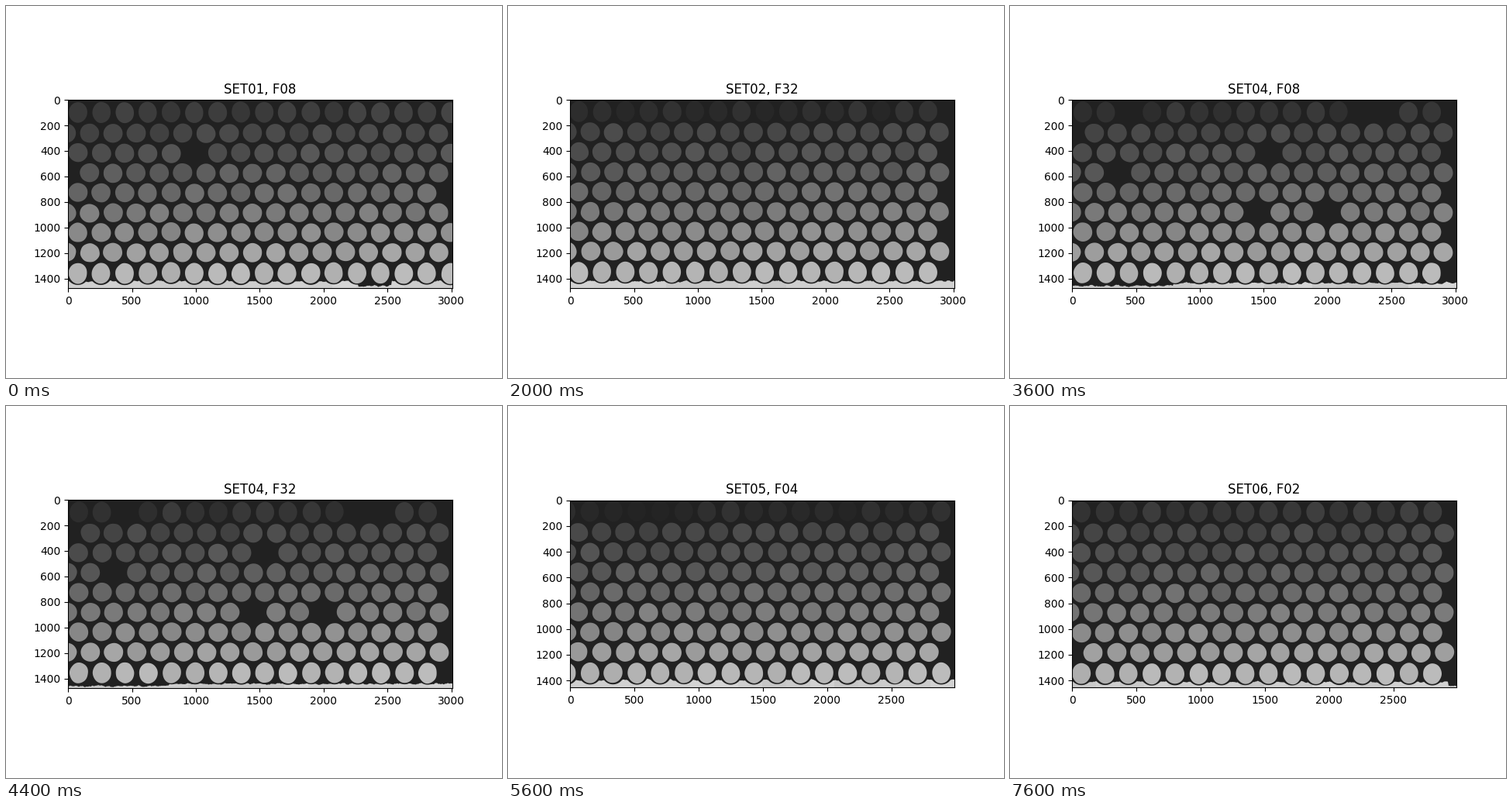
A matplotlib script for the animation above (8000 ms loop, 640x480 px).

```python
import itertools

import numpy as np
import matplotlib.pyplot as plt
from matplotlib.animation import FuncAnimation
from matplotlib.collections import PolyCollection

BACKGROUND = 33
LEFT, WIDTH, MIDDLE = 80, 496, 242.4  # plot area in stage pixels
LARGE, SMALL = (3008, 1473), (2990, 1455)
ROWS = 9
FIRST, LAST = 0, ROWS - 1


def sample(size, x0, y0, top_gray, sand, x_max=566, holes=(), bare=(0, 0)):
    """Key figures of one packing; holes are (row, column) without a grain."""
    return dict(size=size, x0=x0, y0=y0, top_gray=top_gray, sand=sand,
                x_max=x_max, holes=holes, bare=bare)


SAMPLES = [
    sample(LARGE, 92.9, 137.4, 62, 353.2, x_max=580,
           holes=[(2, 5), (3, 0), (4, 16)], bare=(455, 497)),
    sample(LARGE, 91.3, 136.0, 46, 352.0),
    sample(LARGE, 75.9, 137.1, 60, 353.7, x_max=580,
           holes=[(7, 4), (7, 16)], bare=(533, 550)),
    sample(LARGE, 93.8, 137.0, 52, 355.4,
           holes=[(0, 2), (0, 12), (0, 13), (1, 0), (2, 8), (3, 2),
                  (5, 8), (5, 11)], bare=(80, 210)),
    sample(SMALL, 75.6, 135.8, 43, 352.0),
    sample(SMALL, 92.2, 136.7, 57, 355.4, holes=[(7, 0)], bare=(566, 577)),
]
STEPS = [*itertools.product(range(4), (8, 16, 32)),
         *((4, 2 ** n) for n in range(6)), (5, 1), (5, 2)]

fig, ax = plt.subplots(figsize=(6.4, 4.8), dpi=100)


def to_data(points, size):
    """Turn stage pixels into image coordinates."""
    w, h = size
    scale = w / WIDTH
    x, y = np.asarray(points, float).T
    return np.column_stack([(x - LEFT) * scale - 0.5,
                            (y - MIDDLE) * scale + h / 2 - 0.5])


def gray(level):
    return (np.clip(level, 0, 255) / 255,) * 3


def radii(row):
    return (11.9, 13.4) if row in (FIRST, LAST) else (12.4, 12.2)


def row_offset(row):
    return 25.6 * row + 1.2 * (row > FIRST) + 1.2 * (row == LAST)


def row_gray(s, row):
    return s["top_gray"] if row == FIRST else 65 + 6.6 * row + row ** 2


def grain(cx, cy, rx, ry, rng):
    angle = np.linspace(0, 2 * np.pi, 60, endpoint=False)
    radius = 1 + sum(rng.normal(0, 0.025 / n) * np.cos(n * angle + rng.uniform(0, 6))
                     for n in (2, 3, 5, 7))
    return np.column_stack([cx + rx * radius * np.cos(angle),
                            cy + ry * radius * np.sin(angle)])


def packing(s, seed, step):
    """Staggered rows, each shaded by how high its grains' tops lie."""
    rng = np.random.default_rng(seed)
    wobble = np.random.default_rng(1000 + step)
    pitch = 90300 / s["size"][0]
    shapes, shades, bottom = [], [], []
    for row in range(ROWS):
        start = s["x0"] + pitch / 2 * (row % 2)
        if start - pitch > 72:
            start -= pitch
        xs = np.arange(start, s["x_max"], pitch)
        n = len(xs)
        xs += rng.normal(0, 0.25, n)
        ys = s["y0"] + row_offset(row) * pitch / 30 + rng.normal(0, 0.3, n)
        tops = ys + 0.04 * np.arange(n) + wobble.normal(0, 0.1, n)
        ranks = tops.argsort().argsort() / n - 0.5
        for col, (x, y, rank) in enumerate(zip(xs, ys, ranks)):
            if (row, col) in s["holes"]:
                continue
            shapes.append(grain(x, y, *radii(row), rng))
            shades.append(gray(row_gray(s, row) + 15 * rank))
            if row == LAST:
                bottom.append((x, y))
    return shapes, shades, bottom


def sand(s, bottom, filter_size, step):
    """Bright floor whose surface peaks between the lowest grains."""
    rng = np.random.default_rng(2000 + step)
    x = np.linspace(LEFT, LEFT + WIDTH, WIDTH + 1)
    rough = np.convolve(rng.normal(0, 1.3, len(x) + 4), np.ones(5) / 5, "valid")
    top = s["sand"] + 0.6 * np.log2(filter_size) + rough
    rx, ry = radii(LAST)
    for cx, cy in bottom:
        u = np.clip(abs(x - cx) / (rx + 3), 0, 1)
        rim = cy + (ry + 1.6) * np.sqrt(1 - u ** 2)
        top = np.maximum(top, rim)
    a, b = s["bare"]
    top = np.where((x >= a) & (x <= b), np.maximum(top, 361.3 + rough), top)
    top = np.minimum(top, 364)

    shapes, shades = [], []
    for a, b in itertools.pairwise(range(0, WIDTH + 1, 31)):
        part = slice(a, b + 1)
        shapes.append([*zip(x[part], top[part]), (x[b], 366), (x[a], 366)])
        shades.append(gray(rng.uniform(198, 214)))
    return shapes, shades


def draw(step):
    index, filter_size = STEPS[step]
    s = SAMPLES[index]
    w, h = size = s["size"]
    ax.clear()
    ax.set_facecolor(gray(BACKGROUND))
    ax.set(xlim=(-0.5, w - 0.5), ylim=(h - 0.5, -0.5), aspect="equal",
           xticks=range(0, w, 500), yticks=range(0, h, 200),
           title=f"SET{index + 1:02d}, F{filter_size:02d}")

    shapes, shades, bottom = packing(s, index + 11, step)
    floor, floor_shades = sand(s, bottom, filter_size, step)
    polygons = [to_data(p, size) for p in shapes + floor]
    ax.add_collection(PolyCollection(polygons, facecolors=shades + floor_shades,
                                     edgecolors="none"), autolim=False)


animation = FuncAnimation(fig, draw, frames=len(STEPS), init_func=lambda: draw(0),
                          interval=400, repeat=True, repeat_delay=0)
plt.show()
```
